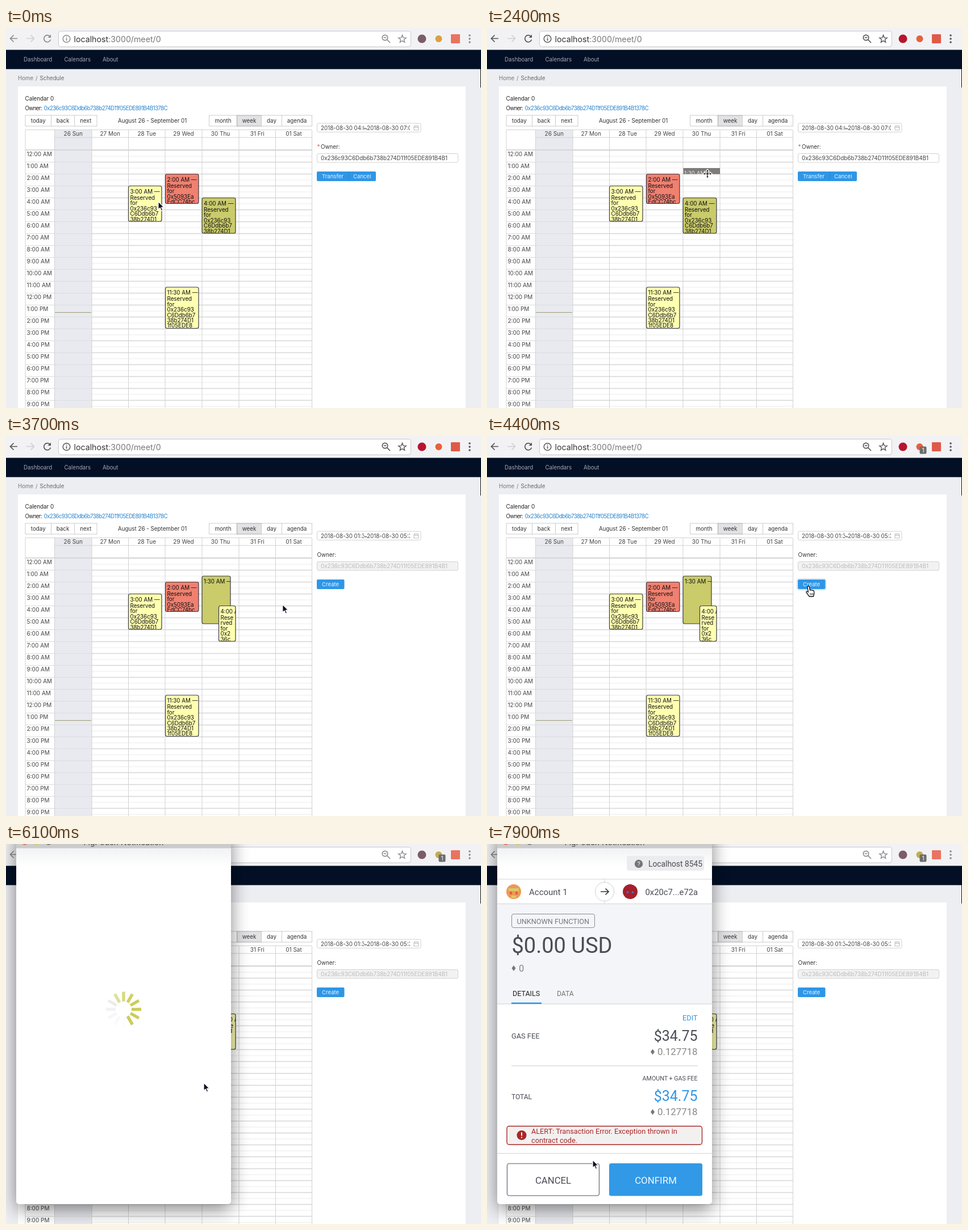
Animation of 836 by 670 pixels, one loop 8000 ms. Source, as an HTML page:

```html
<!DOCTYPE html>
<html lang="en">
<head>
<meta charset="utf-8">
<title>Schedule</title>
<style>
html, body { margin: 0; width: 100%; height: 100%; overflow: hidden; background: #edeef2; }
svg { display: block; }
text { font-family: Inter, "Liberation Sans", sans-serif; white-space: pre; }
.rb text { font-family: Roboto, sans-serif; }
</style>
</head>
<body>
<svg id="stage" width="836" height="670" viewBox="0 0 836 670"></svg>
<script>
const LOOP = 8000, STEP = 100;
const stage = document.getElementById('stage');

// markup helpers
const rect = (x, y, w, h, fill, more = '') =>
  `<rect x="${x}" y="${y}" width="${w}" height="${h}" fill="${fill}" ${more}/>`;
const line = (x1, y1, x2, y2, color, w = 1) =>
  `<path d="M${x1} ${y1}L${x2} ${y2}" stroke="${color}" stroke-width="${w}"/>`;
const circle = (x, y, r, fill, more = '') => `<circle cx="${x}" cy="${y}" r="${r}" fill="${fill}" ${more}/>`;
const path = (d, stroke, w = 1.5, fill = 'none') =>
  `<path d="${d}" fill="${fill}" stroke="${stroke}" stroke-width="${w}"/>`;
const text = (x, y, s, size = 9.8, fill = '#333', more = '') =>
  `<text x="${x}" y="${y}" font-size="${size}" fill="${fill}" ${more}>${s}</text>`;
const mid = (x, y, s, size, fill) => text(x, y, s, size, fill, 'text-anchor="middle"');
const end = (x, y, s, size, fill) => text(x, y, s, size, fill, 'text-anchor="end"');
const group = (id, body, more = '') => `<g id="${id}" ${more}>${body}</g>`;
const crop = (x, y, w, h, body) =>
  `<svg x="${x}" y="${y}" width="${w}" height="${h}" overflow="hidden">${body}</svg>`;

const ADDRESS = '0x236c93C6Ddb6b738b274D11f05EDE891B4B1378C';
const YELLOW = '#ffffb0', OLIVE = '#cacb6a', BLUE = '#2f96e6';
const COLS = [34, 85.5, 151, 215.5, 280, 345, 410, 474.5, 538.5];
const TOP = 215.5, HOUR = 21;
const hourY = h => TOP + h * HOUR;

function toolbar() {
  const c = 'currentColor';
  const star = Array.from({ length: 10 }, (_, i) => {
    const a = (i * 36 - 90) * Math.PI / 180, r = i % 2 ? 3 : 7;
    return (697.5 + r * Math.cos(a)).toFixed(1) + ' ' + (19.5 + r * Math.sin(a)).toFixed(1);
  }).join('L');
  return rect(0, 0, 836, 39, '#f2f2f4') +
    rect(92.5, 5.5, 620, 27.5, '#fff', 'rx="4" stroke="#c9c9cc"') +
    path('M20 18.5H8M13.5 12.5L7.5 18.5L13.5 24.5', c, 1.7) +
    path('M36 18.5H49M43.5 12.5L49.5 18.5L43.5 24.5', '#d0d0d2', 1.7) +
    path('M77.5 15A6 6 0 1 0 78.5 20.5', c, 1.7) + path('M79 11.5V17H73.5Z', 'none', 0, c) +
    circle(106.5, 19, 6.3, 'none', `stroke="${c}" stroke-width="1.5"`) +
    path('M106.5 18V22.5M106.5 15.2V16.8', c, 1.6) +
    text(119.5, 24.5, 'localhost<tspan fill="#777">:3000/meet/0</tspan>', 14.2) +
    circle(667, 17, 4.7, 'none', `stroke="${c}" stroke-width="1.7"`) +
    path('M670.5 20.5L676 26M664.8 17H669.2', c, 1.7) +
    path('M' + star + 'Z', c, 1.4) +
    circle(732, 19, 7.5, '#b8142f', 'id="ext1"') +
    circle(761.5, 19, 6, '#e8603c', 'id="ext2"') +
    rect(783, 11, 16, 16, '#e8604c', 'id="ext3" rx="1"') +
    group('badge', rect(761.5, 18.5, 12, 13, '#6c6c6c', 'rx="2"') + mid(767.5, 29, '1', 10, '#fff')) +
    [13, 19, 25].map(y => circle(816, y, 1.8, c)).join('');
}

function page() {
  const nav = [[31, 'Dashboard'], [102.5, 'Calendars'], [170, 'About']];
  const tight = 'letter-spacing="-.65"';
  return rect(0, 72, 836, 598, '#edeef2') + rect(0, 38.5, 836, 34, '#020f25') +
    nav.map(([x, s]) => text(x, 59, s, 9.75, '#a3a9b3')).join('') +
    text(21, 91.5, 'Home', 9.7, '#777') + text(52, 91.5, '/', 9.7, '#777') +
    text(59.5, 91.5, 'Schedule', 9.7, '#666') +
    rect(21, 103, 788, 567, '#fff') + rect(835, 72, 1, 33, '#111') +
    text(33.5, 127.5, 'Calendar 0', 9.8, '#222') +
    text(33.5, 145, 'Owner:', 9.75, '#222', tight) + text(66.5, 145, ADDRESS, 9.75, '#2a86cf', tight);
}

function buttons() {
  const bar = (xs, names) => names.map((s, i) => {
    const on = s === 'week', w = xs[i + 1] - xs[i];
    return rect(xs[i], 154, w, 19, on ? '#e2e2e5' : '#fff', `stroke="${on ? '#aaa' : '#ccc'}"`) +
      mid(xs[i] + w / 2, 167, s);
  }).join('');
  return bar([34, 79.5, 120.5, 160], ['today', 'back', 'next']) +
    text(197, 167, 'August 26 - September 01') +
    bar([357.5, 406.5, 449.5, 485.5, 538.5], ['month', 'week', 'day', 'agenda']);
}

function grid() {
  const days = ['26 Sun', '27 Mon', '28 Tue', '29 Wed', '30 Thu', '31 Fri', '01 Sat'];
  let out = rect(85.5, 180, 65.5, 490, '#e9eaef');
  for (let h = 0; h < 22; h++) {
    const y = hourY(h), half = y + HOUR / 2;
    out += line(151, half, 538, half, '#ececee') + line(34, y, 85, y, '#dadadc') +
      line(86, y, 150, y, '#dcdde2') + line(151, y, 538, y, '#d6d6d8', 1.3) +
      text(36.5, y + 10.5, `${h % 12 || 12}:00 ${h < 12 ? 'AM' : 'PM'}`, 10, '#444');
  }
  out += line(34, 179.5, 538, 179.5, '#d2d2d4') + line(85, 193, 538, 193, '#d2d2d4') +
    line(34, TOP - 0.5, 538, TOP - 0.5, '#d2d2d4', 1.4) +
    COLS.map(x => line(x, 180, x, 670, '#d2d2d4')).join('') +
    days.map((s, i) => mid((COLS[i + 1] + COLS[i + 2]) / 2, 190, s, 10, '#444')).join('');
  return out + line(86, 501.5, 150, 501.5, '#9b9b73', 1.2);
}

function event(x, y, w, h, fill, lines) {
  const body = lines.map((s, i) => text(3, i ? 15 + i * 9.4 : 13, s, 9.8, '#0e0f14')).join('');
  return rect(x, y, w, h, fill, 'rx="3" stroke="#3a3d48" stroke-width="1.2"') +
    crop(x, y, w, h - 0.5, body);
}
const hex = ['Reserved', 'for', '0x236c93', 'C6Ddb6b7', '38b274D1', '1f05EDE8'];

function events() {
  return event(215.5, hourY(3), 58.5, 62.5, YELLOW, ['3:00 AM —', ...hex.slice(0, 5)]) +
    event(280.5, hourY(2), 58.5, 52, '#f0806f', ['2:00 AM —', 'Reserved', 'for', '0x5093Ea', 'EdCC74bc']) +
    event(280.5, hourY(11.5), 58.5, 72.5, YELLOW, ['11:30 AM —', ...hex]);
}

function dates(from, to) {
  const field = (x, w, s) => crop(x, 168, w, 16, text(0, 11.7, '2018-08-30 ' + s, 9.85, '#444'));
  return rect(547.5, 168, 182.5, 15.5, '#fff', 'rx="2.5" stroke="#d2d2d4"') +
    field(554, 76, from) + text(629.5, 179.7, '~', 9.8, '#444') + field(635, 76, to) +
    rect(718, 173, 8, 7, 'none', 'stroke="#bbb"') + path('M718 175.5H726M720 171.5V174M724 171.5V174', '#bbb', 1);
}
const owner = (bg, color) => rect(547.5, 221.5, 248, 15.5, bg, 'rx="2.5" stroke="#d2d2d4"') +
  text(554, 232.7, ADDRESS.slice(0, 38), 9.9, color);

function before() {
  return event(345, hourY(4), 59, 62.5, OLIVE, ['4:00 AM —', ...hex.slice(0, 5)]) +
    dates('04:00', '07:00') +
    text(547.5, 213, '*', 10, '#e05548') + text(554, 212.5, 'Owner:') + owner('#fff', '#444') +
    rect(547, 253, 104, 17, BLUE, 'rx="2"') + line(603, 253, 603, 270, '#2787d6') +
    text(556, 265, 'Transfer', 9.6, '#eaf5ff') + text(611, 265, 'Cancel', 9.6, '#eaf5ff');
}

function after() {
  return event(345, hourY(1.5), 50, 84, OLIVE, ['1:30 AM —']) +
    event(374.5, hourY(4), 29.5, 62.5, YELLOW, ['4:00 AM', 'Rese', 'rved', 'for', '0x2', '36c']) +
    dates('01:30', '05:30') + text(547.5, 212.5, 'Owner:') + owner('#f2f2f3', '#bbb') +
    rect(545.5, 251.5, 51, 20, '#fff', 'id="ring" rx="3" stroke="#c3d5e6"') +
    rect(547, 253, 48.5, 17, BLUE, 'rx="2"') + text(556, 265, 'Create', 9.6, '#eaf5ff');
}

function selection() {
  return rect(345.5, hourY(1.5), 64.5, 1, '#2f2a26', 'id="span" fill-opacity=".62"') +
    rect(345, hourY(4), 59, 0, '#39404e', 'id="overlap" fill-opacity=".55"') +
    `<svg id="label" x="345.5" y="${hourY(1.5)}" width="64.5" height="1" overflow="hidden">` +
    text(1.5, 13, '1:30 AM —', 9.8, '#e8e6e2') + text(1.5, 26, '', 9.8, '#e8e6e2', 'id="till"') + '</svg>';
}

function details() {
  const gem = (x, y) => path(`M${x} ${y - 5}L${x + 3.5} ${y}L${x} ${y + 5}L${x - 3.5} ${y}Z`, 'none', 0, '#777');
  const cost = (y, color) => end(370.5, y, '$34.75', 25, color) +
    gem(291.5, y + 19.5) + end(370.5, y + 25, '0.127718', 16.8, '#888');
  const ink = '#4a4d55', red = '#a82828';
  return rect(246, 21, 136, 26, '#ececef', 'rx="4"') + circle(267, 35, 7.2, '#757578') +
    mid(267, 39, '?', 11, '#fff') + text(284, 40, 'Localhost 8545', 13.8, ink) +
    line(18, 62, 396, 62, '#d2d3d6') + line(207, 62, 207, 105, '#d2d3d6') +
    circle(47, 84, 13, '#ee9a52') + rect(38, 78, 18, 5, '#d9c96a') + rect(40, 84, 4, 5, '#e35f4c') +
    rect(50, 84, 4, 5, '#e35f4c') + rect(43, 91, 8, 4, '#d9c96a') +
    text(74, 89.5, 'Account 1', 15, ink) +
    circle(207, 84, 16.5, '#fff', 'stroke="#cfd0d4"') + path('M200 84H213.5M208.5 78.5L214 84L208.5 89.5', '#333', 1.6) +
    circle(252, 84, 13, '#a3202c') + circle(247.5, 85, 1.8, '#4a78c8') + circle(256.5, 85, 1.8, '#4a78c8') +
    text(278.5, 89.5, '0x20c7...e72a', 14.8, ink) +
    rect(18, 105.5, 378, 176.5, '#f3f5f8') + line(18, 105.5, 396, 105.5, '#d2d3d6') +
    line(18, 282, 396, 282, '#cfd1d5') +
    rect(43.5, 123.5, 146, 24, 'none', 'rx="3.5" stroke="#8a8c92"') +
    text(52.5, 140.5, 'UNKNOWN FUNCTION', 12.7, '#77797f') +
    text(43.5, 192, '$0.00 USD', 38, ink) + gem(47, 219) + text(56, 225, '0', 16.5, '#888') +
    text(45, 268, 'DETAILS', 12.5, '#222') + text(123, 268, 'DATA', 12.2, '#777') +
    rect(43, 279.5, 53, 2.5, BLUE) +
    end(370.5, 311, 'EDIT', 12.7, BLUE) + text(43, 342.5, 'GAS FEE', 12.8, ink) + cost(347, ink) +
    line(43, 391, 371, 391, '#c9cacd') + end(370.5, 417, 'AMOUNT + GAS FEE', 10.7, ink) +
    text(43, 449.5, 'TOTAL', 12, ink) + cost(453, BLUE) +
    group('alert', rect(35, 497.5, 343.5, 32.5, '#f3f0f0', `rx="4" stroke="${red}" stroke-width="1.4"`) +
      circle(61, 513.5, 8.5, red) + path('M61 508.5V514.5M61 516.5V518.5', '#fff', 2) +
      text(78, 510.8, 'ALERT: Transaction Error. Exception thrown in', 12.7, red) +
      text(78, 527.3, 'contract code.', 12.7, red)) +
    line(18, 545.5, 396, 545.5, '#d2d3d6') +
    rect(35.5, 563.5, 162, 56.5, '#fff', 'rx="3.5" stroke="#8b8c90" stroke-width="1.7"') +
    mid(116.5, 598.5, 'CANCEL', 16.7, ink) +
    rect(215, 563, 164, 57.5, '#3299e7', 'rx="3.5"') + mid(297, 598.5, 'CONFIRM', 16.9, '#f1f8ff');
}

function popup() {
  let bars = '';
  for (let i = 0; i < 12; i++)
    bars += rect(14, -2.7, 17, 5.4, '#cacd58', `class="bar" transform="translate(207 291.5) rotate(${i * 30})"`);
  return rect(18, -20, 378, 664, '#000', 'rx="8" opacity=".48" filter="url(#blur)"') +
    rect(18, -20, 378, 655, '#fff', 'rx="5"') + rect(18, 7, 378, 33, 'url(#fade)') +
    rect(18, -20, 378, 27.5, '#cbcbcc') +
    [['33', '#ee5f57'], ['54', '#cdcc50'], ['75', '#77787a']].map(([x, c]) => circle(x, -4, 5.8, c)).join('') +
    group('title', mid(207, 1.5, 'FigPouch Notification', 13.9, '#555')) +
    group('spin', bars) + group('details', details(), 'class="rb"');
}

const edge = 'stroke="#fff" stroke-width="1.2" stroke-linejoin="round"';
const cursors =
  group('arrow', `<path d="M0 0V14L3.2 11.1L5.4 16.2L7.8 15.2L5.6 10.2H10Z" fill="#0d1020" ${edge}/>`) +
  group('move', `<path d="M0-8L3.2-4.4H1.2V-1.2H4.4V-3.2L8 0L4.4 3.2V1.2H1.2V4.4H3.2L0 8L-3.2 4.4H-1.2V1.2H-4.4V3.2L-8 0L-4.4-3.2V-1.2H-1.2V-4.4H-3.2Z" fill="#111" ${edge}/>`) +
  group('hand', '<path d="M-1 1.5Q-1-.5.6-.5T2.4 1.5L3.4 7Q5 5.5 6 7Q7.6 6 8.4 7.6Q10.4 7 10.6 9.5L10.8 13L9.5 18H2.4L-2.2 12Q-4 9.5-2.6 9T.4 10.6Z" fill="#fff" stroke="#111" stroke-width="1.3" stroke-linejoin="round"/>' +
    path('M4 12V15.5M6.3 12V15.5M8.5 12V15.5', '#111', 0.9));

stage.innerHTML =
  '<defs><filter id="blur" x="-30%" y="-30%" width="160%" height="160%"><feGaussianBlur stdDeviation="16"/></filter>' +
  '<linearGradient id="fade" x2="0" y2="1"><stop stop-color="#f1f2f4"/><stop offset="1" stop-color="#fff"/></linearGradient></defs>' +
  group('bar', toolbar()) + page() + buttons() + grid() + events() +
  group('before', before()) + group('after', after()) + group('selection', selection()) +
  group('popup', popup()) + group('cursor', cursors);

const $ = id => document.getElementById(id);
const show = (id, on) => { $(id).style.display = on ? '' : 'none'; };
const set = (id, name, value) => $(id).setAttribute(name, value);
const bars = [...document.querySelectorAll('.bar')];

// pointer path: time, x, y
const PATH = [
  [0, 268, 306], [200, 252, 296], [600, 376, 285], [700, 376, 285], [1500, 384, 264],
  [1700, 384, 264], [2200, 388, 251], [2300, 388, 251], [2400, 388, 257], [3200, 389, 337],
  [4100, 565, 265], [5700, 565, 265], [6100, 348, 421], [6300, 342, 440], [6400, 342, 440],
  [7300, 330, 400], [7700, 100, 530], [7900, 186, 557], [8000, 186, 557]
];
function pointer(t) {
  const i = Math.max(1, PATH.findIndex(k => k[0] >= t));
  const [t0, x0, y0] = PATH[i - 1], [t1, x1, y1] = PATH[i];
  const u = (t - t0) / (t1 - t0);
  return [x0 + (x1 - x0) * u, y0 + (y1 - y0) * u];
}

function draw(t) {
  const [x, y] = pointer(t);
  const active = t >= 800 && t < 4500, open = t >= 4500, made = t >= 3300;
  const drag = t >= 2400 && !made;

  $('bar').style.color = active ? '#555' : '#8b8b8d';
  set('ext1', 'fill', active ? '#b8142f' : '#7c5c67');
  set('ext2', 'fill', active ? '#e8603c' : open ? '#bfae55' : '#dba043');
  set('ext3', 'fill', active ? '#e05a48' : '#ea7360');
  show('badge', t >= 4200);
  show('before', !made);
  show('after', made);
  show('ring', t >= 4200 && t < 5800);

  show('selection', drag);
  if (drag) {
    const slots = Math.max(1, Math.round((y - 249) / (HOUR / 2)));
    const h = slots * HOUR / 2, stop = 1.5 + slots / 2;
    set('span', 'height', h);
    set('label', 'height', h);
    set('overlap', 'height', Math.max(0, hourY(stop) - hourY(4)));
    $('till').textContent = `${Math.floor(stop)}:${stop % 1 ? '30' : '00'} AM`;
  }

  show('popup', open);
  show('title', t >= 4600);
  show('spin', t >= 5800 && t < 6200);
  show('details', t >= 6200);
  show('alert', t >= 6500);
  const lead = 2 + (t - 6100) / 100;
  bars.forEach((b, i) => {
    const age = (((lead - i) % 12) + 12) % 12;
    b.setAttribute('opacity', Math.min(1, (12.5 - age) / 9) ** 1.6);
    b.setAttribute('fill', age > 6 ? '#d6d6dc' : '#cacd58');
  });

  const kind = t >= 2300 && t < 3300 ? 'move' : t >= 4100 && !open ? 'hand' : 'arrow';
  ['arrow', 'move', 'hand'].forEach(k => show(k, k === kind));
  set('cursor', 'transform', `translate(${x} ${y})`);
}

function tick() {
  draw(Math.floor(performance.now() % LOOP / STEP) * STEP);
  requestAnimationFrame(tick);
}
tick();
</script>
</body>
</html>
```
